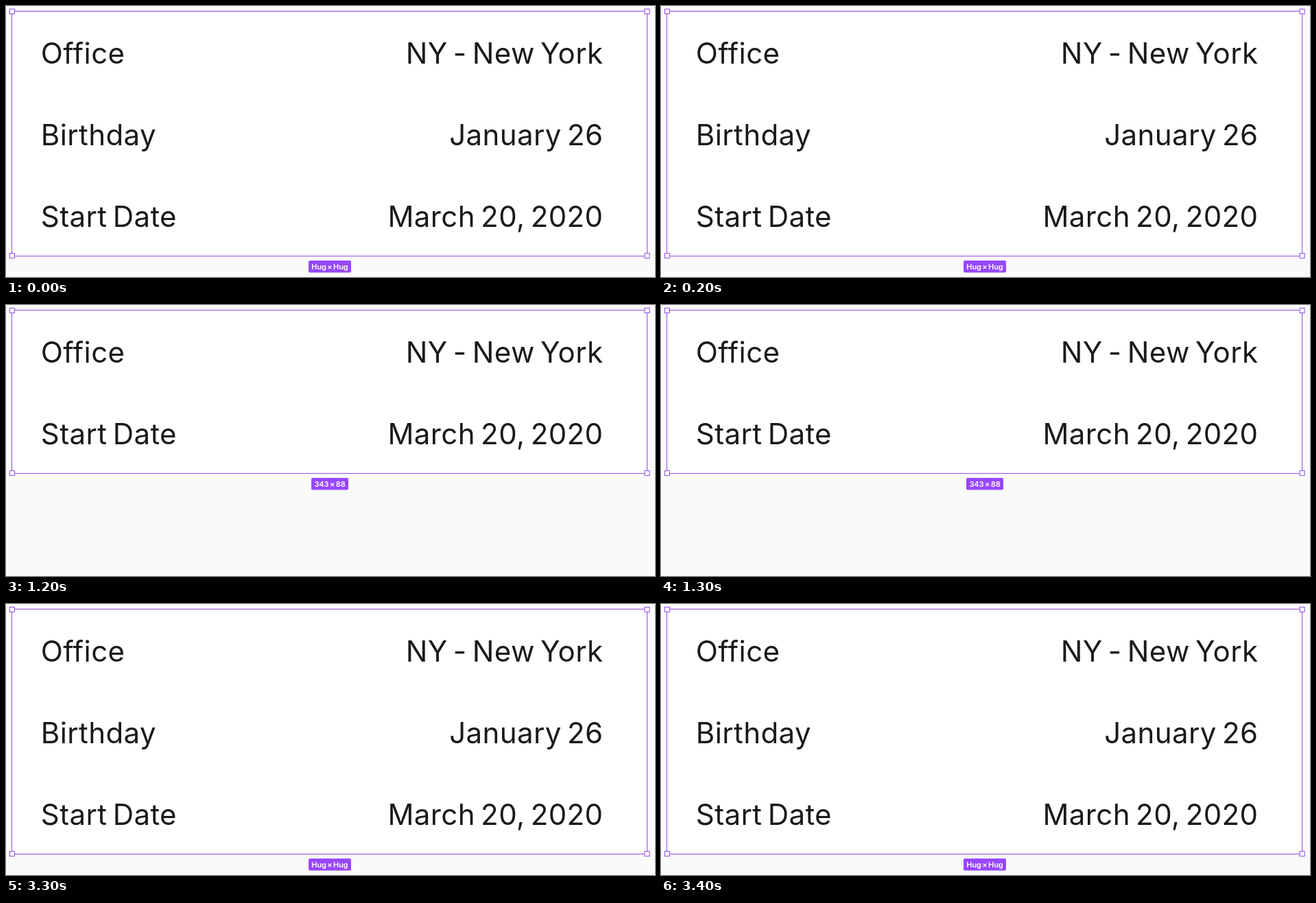
These frames come from a looping animation (946 px wide and 395 px high, 4.7 s). An HTML page:

```html
<!DOCTYPE html>
<html lang="en">
<head>
<meta charset="utf-8">
<title>Auto layout rows</title>
<style>
html, body { margin: 0; width: 100%; height: 100%; overflow: hidden; background: #fafafa; }
svg { display: block; }
text { font-family: Inter, "Liberation Sans", sans-serif; font-optical-sizing: none; }
.row { font-size: 42px; letter-spacing: 0.4px; word-spacing: -4px; fill: #1a1a1a; }
.value { text-anchor: end; }
.frame, .handle { fill: #fff; stroke: #9857e8; stroke-width: 1.1; }
.pill { fill: #9747ff; }
.label { font-size: 11px; font-weight: 600; letter-spacing: -0.1px; word-spacing: -1.2px; text-anchor: middle; fill: #fff; }
</style>
</head>
<body>
<svg id="stage" width="946" height="395" viewBox="0 0 946 395"></svg>
<script>
const LOOP = 4700, HIDE = 1200, SHOW = 3300;
const LEFT = 8.5, TOP = 7.5, RIGHT = 934.5, ROW = 119, MID = 472;
const office = ['Office', 'NY - New York'];
const birthday = ['Birthday', 'January 26'];
const start = ['Start Date', 'March 20, 2020'];

function add(parent, tag, attrs, content = '') {
  const el = document.createElementNS('http://www.w3.org/2000/svg', tag);
  for (const name in attrs) el.setAttribute(name, attrs[name]);
  el.textContent = content;
  return parent.appendChild(el);
}

function buildCard(rows, label, pillWidth) {
  const group = add(document.getElementById('stage'), 'g', {});
  const height = rows.length * ROW, bottom = TOP + height;
  const rect = (name, x, y, width, height, rx = 0) =>
    add(group, 'rect', { class: name, x, y, width, height, rx });

  rect('frame', LEFT, TOP, RIGHT - LEFT, height);
  for (const x of [LEFT + 0.5, RIGHT])
    for (const y of [TOP + 0.5, bottom - 0.5])
      rect('handle', x - 3.5, y - 3.5, 7, 7);

  rows.forEach(([key, value], i) => {
    const y = 84 + i * ROW;
    add(group, 'text', { class: 'row', x: 50.8, y }, key);
    add(group, 'text', { class: 'row value', x: 870.5, y }, value);
  });

  rect('pill', MID - pillWidth / 2, bottom + 6.5, pillWidth, 17.5, 2);
  add(group, 'text', { class: 'label', x: MID, y: bottom + 19.5 }, label);
  return group;
}

const full = buildCard([office, birthday, start], 'Hug × Hug', 62);
const short = buildCard([office, start], '343 × 88', 54);

function draw(t) {
  const hidden = t >= HIDE && t < SHOW;
  full.style.display = hidden ? 'none' : '';
  short.style.display = hidden ? '' : 'none';
}

const begin = performance.now();
function tick() {
  draw((performance.now() - begin) % LOOP);
  requestAnimationFrame(tick);
}
tick();
</script>
</body>
</html>
```
